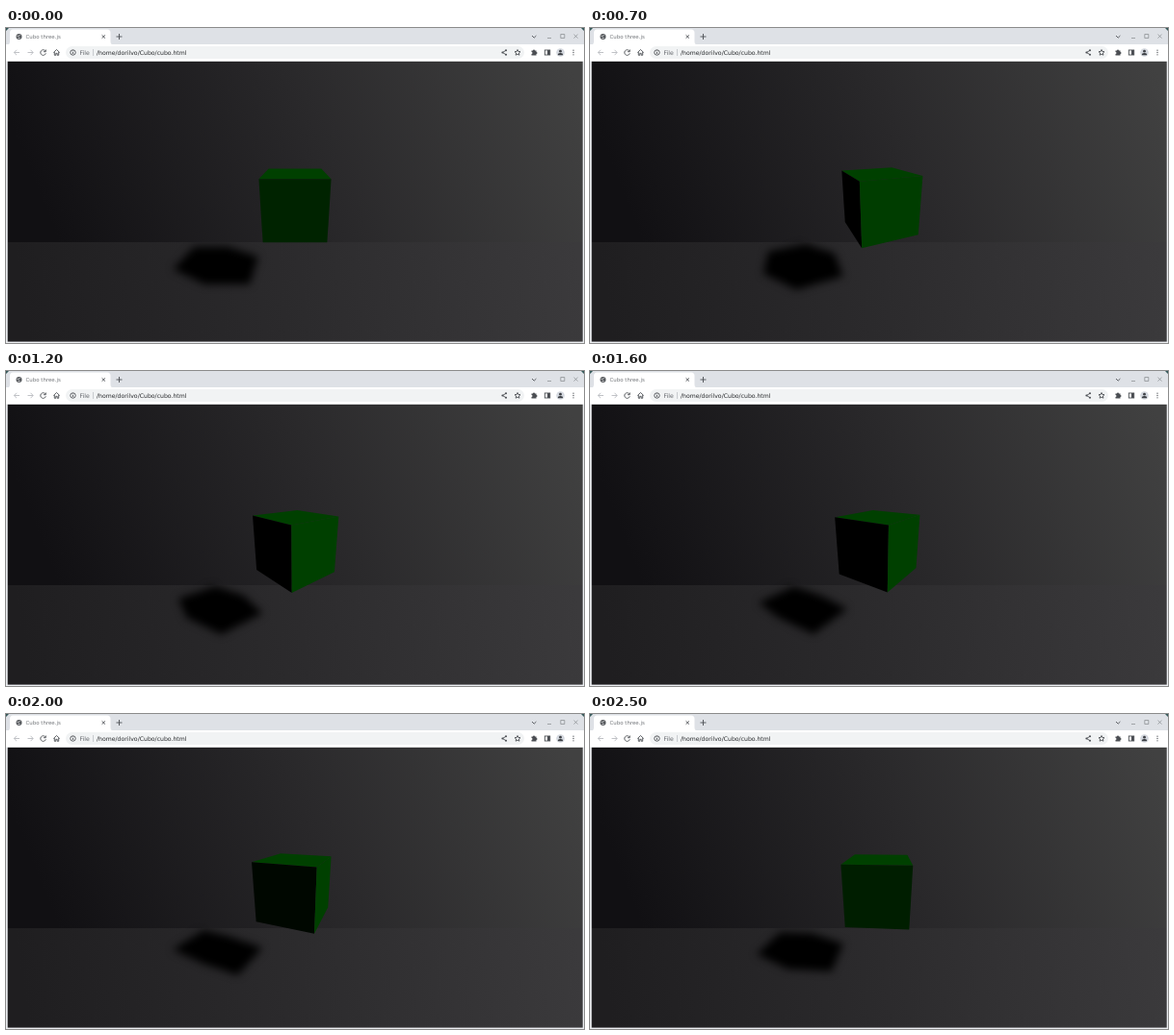
An HTML page with a canvas that plays this animation: 600 by 328 pixels, repeating every 2600 ms.

```html
<!DOCTYPE html>
<html lang="en">
<head>
<meta charset="utf-8">
<title>Cubo three.js</title>
<style>
  html, body { margin: 0; width: 100%; height: 100%; overflow: hidden; background: #eceef1; }
  canvas, svg { position: absolute; left: 0; top: 0; width: 600px; height: 328px; display: block; }
  text { font-family: "DejaVu Sans", sans-serif; }
  .line { fill: none; stroke: #4b4e53; stroke-width: .9; }
  .dim { stroke: #b9bcc0; }
</style>
</head>
<body>
<canvas id="view" width="600" height="328"></canvas>
<svg viewBox="0 0 600 328">
  <rect width="600" height="18" fill="#dee1e6"/>
  <path d="M0 0H3L0 3ZM600 0H597L600 3Z" fill="#35595a"/>
  <rect y="17" width="600" height="17.6" fill="#fff"/>
  <path d="M1 17.5Q4 17.5 4 14V5Q4 1.5 7.5 1.5H105Q108.500 1.500 108.500 5V14Q108.500 17.500 112 17.500Z" fill="#fff"/>
  <circle cx="13.500" cy="9" r="3" fill="#55585c"/>
  <path d="M11.500 8.300h2.200l1-1M12.500 10.500h2" stroke="#fff" stroke-width=".7" fill="none"/>
  <text x="20.500" y="11" font-size="5.460" fill="#74777b">Cubo three.js</text>
  <g class="line">
    <path d="M99.600 7.300l3.400 3.400m0-3.400l-3.400 3.400M114.500 9h6M117.500 6v6"/>
    <path d="M546 8l2.200 2.200L550.400 8"/>
    <path d="M562 10.500h4M575.800 6.500h4v4h-4zM589.500 6.600l4 4m0-4l-4 4" stroke="#85888c" stroke-width=".7"/>
    <path class="dim" d="M14 25.500H8.500M11 22.800l-2.700 2.700 2.700 2.700M22.500 25.500H28M25.500 22.800l2.700 2.700-2.700 2.700"/>
    <path d="M40.700 23.700A2.800 2.800 0 1 0 41.300 26.300M41.300 22.500v2.200h-2.300"/>
    <path d="M49.300 25.500l3.200-3 3.200 3M50.300 25v3.300h1.500v-2h1.400v2h1.500V25"/>
  </g>
  <rect x="62" y="19" width="476" height="13" rx="6.500" fill="#f1f3f4"/>
  <circle class="line" cx="69.500" cy="25.500" r="2.700" stroke-width=".7"/>
  <path class="line" d="M69.500 25v2M69.500 23.600v.7" stroke-width=".7"/>
  <text x="76.500" y="27.500" font-size="6.160" fill="#62656a">File</text>
  <path d="M90.500 22v7" stroke="#b6b9bd" stroke-width=".7"/>
  <text x="94" y="27.500" font-size="6.160" fill="#27292c">/home/dorilvo/Cubo/cubo.html</text>
  <path class="line" d="M519 23.300l-3.600 2.200 3.600 2.200" stroke-width=".7"/>
  <g fill="#4b4e53">
    <circle cx="519" cy="23.300" r="1"/><circle cx="515.400" cy="25.500" r="1"/><circle cx="519" cy="27.700" r="1"/>
    <path d="M545.500 23.500h1.500a1 1 0 0 1 2 0h1.500v1.500a1 1 0 0 1 0 2v1.500h-5v-1.500a1 1 0 0 0 0-2z"/>
    <path d="M562 23h2.700v5H562z"/>
    <circle cx="589" cy="23.200" r=".65"/><circle cx="589" cy="25.500" r=".65"/><circle cx="589" cy="27.800" r=".65"/>
  </g>
  <path class="line" d="M531 22.500l.9 2 2.100.2-1.600 1.400.5 2.100-1.900-1.100-1.900 1.100.5-2.100-1.600-1.400 2.100-.2z" stroke-width=".7"/>
  <rect class="line" x="559.300" y="23" width="5.400" height="5"/>
  <circle cx="575.500" cy="25.500" r="4.300" fill="#d5d9e0"/>
  <circle cx="575.500" cy="24.200" r="1.400" fill="#3d4045"/>
  <path d="M572.800 28.300q0-2.200 2.700-2.200t2.700 2.200z" fill="#3d4045"/>
</svg>
<script>
const ctx = document.getElementById('view').getContext('2d');
const LEFT = 1.7, TOP = 34.6, WIDTH = 597, HEIGHT = 292, EDGE = 223;
const CX = 300, CY = 181, FOCAL = 190;
const DIST = Math.sqrt(10), SIN = 1 / DIST, COS = 3 / DIST;
const LIGHT = { x: 1, y: 1, z: .5 };
const FLOOR = -2, WALL = -2;
const STEP = 100, LOOP = 2600, TURN = .06;

// Camera at (0, 1, 3), looking at the centre of a unit cube.
function project([x, y, z]) {
  const k = FOCAL / (DIST - y * SIN - z * COS);
  return [CX + x * k, CY - (y * COS - z * SIN) * k];
}

function fill(points, color) {
  ctx.beginPath();
  points.forEach(p => ctx.lineTo(...p));
  ctx.closePath();
  ctx.fillStyle = color;
  ctx.fill();
}

function hull(points) {
  const sorted = [...points].sort((a, b) => a[0] - b[0] || a[1] - b[1]);
  const half = list => {
    const out = [];
    for (const p of list) {
      while (out.length > 1) {
        const [a, b] = out.slice(-2);
        if ((b[0] - a[0]) * (p[1] - a[1]) > (b[1] - a[1]) * (p[0] - a[0])) break;
        out.pop();
      }
      out.push(p);
    }
    return out.slice(0, -1);
  };
  return [...half(sorted), ...half(sorted.reverse())];
}

function gradient(x0, y0, x1, y1, ...colors) {
  const g = ctx.createLinearGradient(x0, y0, x1, y1);
  colors.forEach((c, i) => g.addColorStop(i / (colors.length - 1), c));
  return g;
}

const onFloor = ([x, y, z]) => {
  const t = y - FLOOR;
  return [x - LIGHT.x * t, FLOOR, z - LIGHT.z * t];
};

const onWall = ([x, y, z]) => {
  const t = (z - WALL) / LIGHT.z;
  return [x - LIGHT.x * t, y - t + .1, WALL];
};

function shadow(corners, cast, top, bottom) {
  ctx.save();
  ctx.beginPath();
  ctx.rect(LEFT, top, WIDTH, bottom - top);
  ctx.clip();
  ctx.filter = 'blur(4px)';
  fill(hull(corners.map(c => project(cast(c)))), '#000');
  ctx.restore();
}

function room() {
  ctx.fillStyle = gradient(60, 235, 580, 25, '#111013', '#29282a', '#414141');
  ctx.fillRect(LEFT, TOP, WIDTH, EDGE - TOP);
  ctx.fillStyle = gradient(20, 300, 590, 215, '#1f1e20', '#2c2b2d', '#3b3a3c');
  ctx.fillRect(LEFT, EDGE, WIDTH, TOP + HEIGHT - EDGE);
}

function cube(top, bottom, angle) {
  const green = n => `rgb(0,${Math.round(Math.max(0, Math.min(64, 105 * n)))},0)`;
  fill(top.map(project), green(2 / 3));
  for (let i = 0; i < 4; i++) {
    const a = angle + (i + 1) * Math.PI / 2, j = (i + 1) % 4;
    if (Math.cos(a) < 1 / 6) continue;
    const side = [top[i], top[j], bottom[j], bottom[i]].map(project);
    fill(side, green((2 * Math.sin(a) + Math.cos(a)) / 3));
  }
}

function draw(time) {
  const angle = Math.floor(time % LOOP / STEP) * TURN;
  const ring = y => [0, 1, 2, 3].map(i => {
    const a = angle + Math.PI / 4 + i * Math.PI / 2;
    return [Math.SQRT1_2 * Math.sin(a), y, Math.SQRT1_2 * Math.cos(a)];
  });
  const top = ring(.5), bottom = ring(-.5), corners = [...top, ...bottom];
  ctx.clearRect(0, 0, 600, 328);
  room();
  shadow(corners, onWall, TOP, EDGE);
  shadow(corners, onFloor, EDGE, TOP + HEIGHT);
  cube(top, bottom, angle);
}

const start = performance.now();
function tick() {
  draw(performance.now() - start);
  requestAnimationFrame(tick);
}
tick();
</script>
</body>
</html>
```
